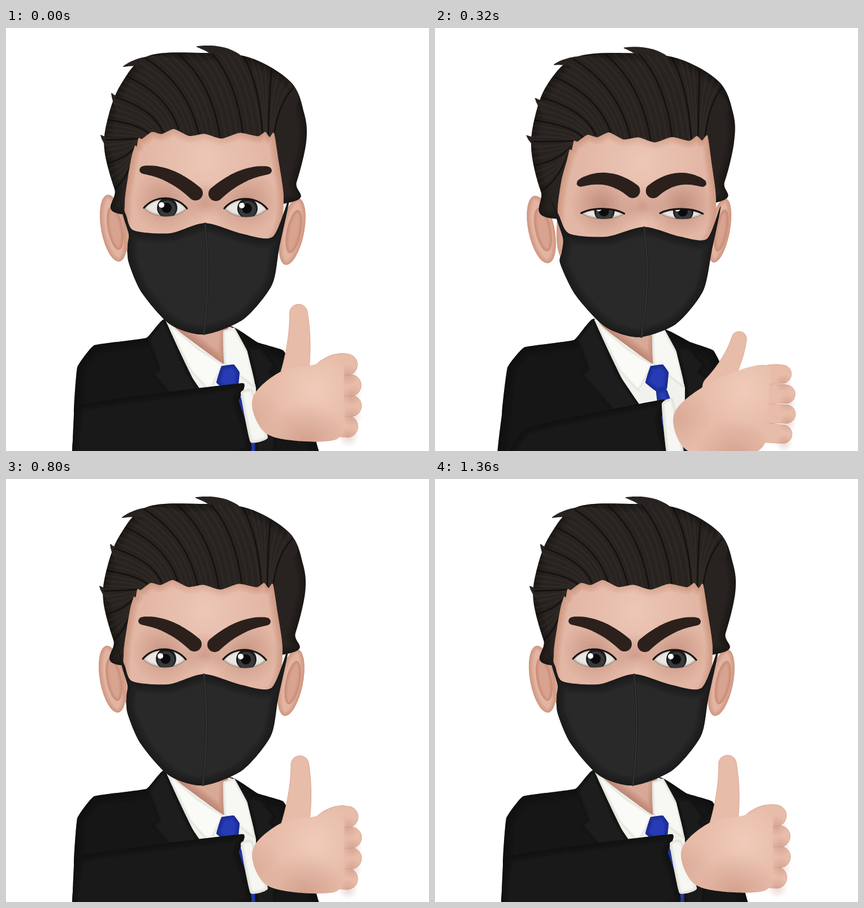
An HTML page with a canvas that plays this animation: 748x748 px, repeating every 1.44 s.

```html
<!DOCTYPE html>
<html lang="en">
<head>
<meta charset="utf-8">
<title>Thumbs up</title>
<style>
html, body { margin: 0; width: 100%; height: 100%; overflow: hidden; background: #fff; }
canvas { display: block; width: 100%; height: 100%; }
</style>
</head>
<body>
<canvas id="stage" width="748" height="748"></canvas>
<script>
const ctx = document.getElementById('stage').getContext('2d');
const STEP = 80, LOOP = 1440, TURN = 80, SETTLED = 480;

// --- numbers and points
const lerp = (a, b, t) => a + (b - a) * t;
const mix = (p, q, t) => p.map((v, i) => lerp(v, q[i], t));
const span = (t, a, b) => Math.min(1, Math.max(0, (t - a) / (b - a)));
const smooth = (t, a, b) => { const u = span(t, a, b); return u * u * (3 - 2 * u); };
const points = s => s.trim().split(/\s+/).map(p => p.split(',').map(Number));
const blend = (a, b, t) => points(a).map((p, i) => mix(p, points(b)[i], t));
const quad = (a, c, b, t) => mix(mix(a, c, t), mix(c, b, t), t);

function along(pts, u) {
  const x = u * (pts.length - 1), i = Math.min(pts.length - 2, Math.floor(x));
  return mix(pts[i], pts[i + 1], x - i);
}

// --- paths
function curve(pts, bend = 1 / 6) {
  const path = new Path2D(), n = pts.length, at = i => pts[(i + n) % n];
  path.moveTo(...pts[0]);
  pts.forEach((b, i) => {
    const a = at(i - 1), c = at(i + 1), d = at(i + 2);
    path.bezierCurveTo(b[0] + (c[0] - a[0]) * bend, b[1] + (c[1] - a[1]) * bend,
      c[0] - (d[0] - b[0]) * bend, c[1] - (d[1] - b[1]) * bend, ...c);
  });
  path.closePath();
  return path;
}

// A round brush swept along a curve while its radius changes.
function sweep(a, c, b, r0, r1, power = 1) {
  const path = new Path2D();
  for (let i = 0; i <= 50; i++) {
    const t = i / 50, [x, y] = quad(a, c, b, t), r = lerp(r0, r1, t ** power);
    path.moveTo(x + r, y);
    path.arc(x, y, r, 0, 7);
  }
  return path;
}

function arc(a, c, b) {
  const path = new Path2D();
  path.moveTo(...a);
  path.quadraticCurveTo(...c, ...b);
  return path;
}

function oval(x, y, rx, ry, tilt) {
  const path = new Path2D();
  path.ellipse(x, y, rx, ry, tilt, 0, 7);
  return path;
}

// --- paint
function fill(path, color) { ctx.fillStyle = color; ctx.fill(path); }
function line(path, color, width) { ctx.strokeStyle = color; ctx.lineWidth = width; ctx.stroke(path); }
function dot(x, y, r, color) { fill(oval(x, y, r, r, 0), color); }
function inside(path, paint) { ctx.save(); ctx.clip(path); paint(); ctx.restore(); }
function moved(x, y, paint) { ctx.save(); ctx.translate(x, y); paint(); ctx.restore(); }

function blob(x, y, r, rgb, alpha) {
  const g = ctx.createRadialGradient(x, y, 0, x, y, r);
  g.addColorStop(0, `rgba(${rgb},${alpha})`);
  g.addColorStop(1, `rgba(${rgb},0)`);
  dot(x, y, r, g);
}

// Fill with a soft darker rim that suggests volume.
function solid(path, color, rim, width) {
  fill(path, color);
  inside(path, () => {
    for (let k = 1; k <= 6; k++) line(path, `rgba(${rim},.07)`, width * k / 6);
  });
}

const SKIN = '#e7bca9', SKIN_SHADE = '165,98,80', HAIR = '#282320';

// --- parts
function drawTorso(yaw) {
  const body = curve(blend(
    '61,830 112,675 137,602 166,580 236,568 282,511 440,555 480,554 503,573 526,645 567,830',
    '132,830 120,682 126,600 156,561 248,548 280,515 400,528 445,556 490,570 512,612 563,830', yaw), .05);
  const piece = (s, color, rim, width) => solid(curve(points(s), .03), color, rim, width);
  solid(body, '#161616', '0,0,0', 36);
  piece('282,515 400,530 442,635 441,760 415,760 350,660', '#f1f1ed', '190,190,180', 4);
  piece('286,512 392,525 385,594 300,532', '#d9a997', '140,78,63', 30);
  piece('282,516 340,566 384,595 360,642 325,605', '#fafaf7', '185,185,175', 9);
  piece('384,536 404,530 430,578 441,637 386,594', '#f7f7f4', '185,185,175', 9);
  piece('391,643 410,640 441,725 441,760 407,760', '#2a40b8', '10,20,90', 16);
  piece('381,598 403,595 413,609 410,638 392,643 372,627', '#263bb4', '10,20,90', 16);
  inside(body, () => {
    piece('280,514 250,551 268,603 258,614 385,760 425,760 325,612', '#1d1d1d', '0,0,0', 14);
    piece('425,563 452,565 478,596 470,608 486,622 475,760 441,760 442,635', '#1b1b1b', '0,0,0', 14);
  });
  dot(508, 702, 5, '#eeeeea');
}

function drawHand(grip) {
  const soft = path => {
    line(path, '#d7a18d', 1.5);
    fill(path, SKIN);
  };
  const reach = lerp(633, 621, grip), r = lerp(15, 18.5, grip), gap = lerp(35, 36.5, grip);
  for (let i = 3; i >= 0; i--) {
    const y = lerp(618, 595, grip) + i * gap, x = reach + 8 * Math.sin(i) - r;
    const base = [555, lerp(640, 620, grip) + i * 25];
    soft(sweep(base, [575, y - 3], [x, y], r + 3, r));
    blob(x + 2, y + r, r, SKIN_SHADE, .25);
  }
  soft(sweep(mix([490, 640], [508, 622], grip), mix([530, 605], [522, 560], grip),
    mix([545, 566], [517, 504], grip), lerp(20, 25, grip), lerp(12, 15.5, grip)));
  const palm = curve(blend(
    '418,692 468,645 540,607 590,605 588,650 582,735 545,765 480,770 432,750',
    '437,652 485,608 545,595 592,581 597,640 595,715 560,731 480,725 447,702', grip));
  fill(palm, SKIN);
  inside(palm, () => {
    blob(545, 640, 75, '250,217,201', .5);
    blob(530, lerp(775, 735, grip), 75, SKIN_SHADE, .3);
    blob(430, 690, 60, SKIN_SHADE, .2);
  });
}

function drawArm({ grip, lift, swing }) {
  moved(0, (1 - lift) * 250, () => {
    solid(curve(blend('90,820 170,722 398,667 396,700 406,820',
      '122,820 130,668 418,628 412,660 432,750', grip), .04), '#191919', '0,0,0', 26);
    solid(curve(blend('396,672 416,663 434,775 404,775',
      '415,645 436,640 463,724 432,732', grip), .06), '#f6f6f2', '180,180,170', 12);
    ctx.translate(440, 680);
    ctx.rotate(swing);
    ctx.translate(-440, -680);
    drawHand(grip);
  });
}

function drawEar(x, y, rx, ry, tilt) {
  const ear = oval(x, y, rx, ry, tilt);
  solid(ear, '#e3b4a2', SKIN_SHADE, 16);
  inside(ear, () => solid(oval(x + 3, y, rx * .6, ry * .65, tilt), '#d8a491', SKIN_SHADE, 12));
}

function drawHair(yaw, hairline) {
  const shape = blend(
    '182,165 204,100 266,59 345,45 445,60 520,93 552,155 543,210 528,272 500,310 241,368 190,305 180,235',
    '180,160 203,100 250,50 345,44 430,52 503,95 527,150 531,200 514,272 495,310 212,330 192,285 174,215', yaw);
  const hair = curve(shape);
  solid(hair, HAIR, '8,6,5', 30);

  const tufts = [
    ['320,75 270,58 248,51', '300,75 250,50 208,68'],
    ['400,70 380,52 345,45', '400,62 380,38 338,33'],
    ['235,175 195,165 162,161', '225,150 200,140 187,116'],
    ['240,205 195,205 163,193', '205,205 185,210 168,190'],
    ['520,175 545,195 537,234', '480,140 525,130 497,93']
  ];
  for (const [turned, front] of tufts) fill(sweep(...blend(turned, front, yaw), 20, 1), HAIR);

  // Locks run from the hairline back over the crown.
  const crown = [...shape.slice(-2), ...shape.slice(0, 7)];
  inside(hair, () => {
    for (let i = 0; i <= 44; i++) {
      const u = i / 44, root = along(hairline, u), tip = along(crown, u * .9);
      const lock = arc(root, [lerp(root[0], tip[0], .2), lerp(root[1], tip[1], .65)], tip);
      if (i % 4) line(lock, 'rgba(72,64,57,.22)', 3);
      else line(lock, 'rgba(12,9,8,.7)', 2.5);
    }
  });
}

function drawEye(x, y, half, lid) {
  const top = lerp(17, 2, lid), low = lerp(15, 7, lid), mid = y + lid * 5;
  const lash = new Path2D();
  lash.moveTo(x - half, mid);
  lash.bezierCurveTo(x - half * .5, mid - top / .75, x + half * .5, mid - top / .75, x + half, mid + 1);
  const eye = new Path2D(lash);
  eye.bezierCurveTo(x + half * .6, mid + low / .75, x - half * .6, mid + low / .75, x - half, mid);
  solid(eye, '#eae6e2', '100,85,80', 8);
  inside(eye, () => {
    dot(x + 3, y, 18, '#1b1c1e');
    dot(x + 3, y + 2, 15, '#37393b');
    dot(x + 2, y, 9, '#0b0b0c');
    dot(x - 7, y - 5, 5, '#fff');
  });
  line(eye, 'rgba(80,50,42,.4)', 1);
  line(lash, '#171311', 3.2);
}

// The brow keeps its place over the eye; anger lifts the outside and drops the inside.
function drawBrow(x, y, wide, anger) {
  const outer = [x - 41 * wide, y + lerp(-43, -67, anger)];
  const arch = [x + lerp(8, 6, anger) * wide, y + lerp(-73, -67, anger)];
  const inner = [x + 53 * wide, y + lerp(-40, -26, anger)];
  fill(sweep(outer, arch, inner, 5, 13, .4), '#2b201b');
}

function drawFace(yaw, { anger, lid }, hairline) {
  const jaw = blend('520,262 522,320 517,392 430,540 258,442 246,375 256,300 280,262',
    '482,235 491,300 478,370 350,520 216,400 210,310 216,262 222,228', yaw);
  const fringe = [];
  for (let i = 0; i <= 14; i++) {
    const [x, y] = along(hairline, i / 14);
    fringe.push([x, y + (i % 2 ? 4 : -4)]);
  }
  const face = curve([...fringe, ...jaw], .1);
  const eyes = [
    { at: mix([358, 350], [282, 318], yaw), wide: 1, side: 1 },
    { at: mix([486, 347], [424, 319], yaw), wide: lerp(.72, 1, yaw), side: -1 }
  ];
  const bridge = mix(eyes[0].at, eyes[1].at, .5);

  solid(face, '#e3b7a5', SKIN_SHADE, 26);
  inside(face, () => {
    blob(bridge[0], bridge[1] - 85, 105, '243,209,195', .6);
    for (const { at: [x, y] } of eyes) blob(x, y - 12, 58, '155,90,74', lerp(.38, .5, lid));
    blob(bridge[0], bridge[1] - 8, 40, '165,100,84', .35);
    blob(bridge[0] + 3, bridge[1] + 22, 28, '243,205,189', .55);
  });
  for (const { at: [x, y], wide, side } of eyes) {
    drawEye(x, y, lerp(33, 38, wide), lid);
    drawBrow(x, y, wide * side, anger);
  }
}

function drawMask(yaw) {
  solid(curve(blend(
    `215,297 247,332 288,388 360,394 444,380 495,389 518,390 518,392 516,415 490,510
     450,560 400,567 345,545 285,492 240,424 262,447 266,405 245,350`,
    `200,298 212,330 226,358 290,363 352,345 418,364 472,369 502,297 483,390 470,455
     420,515 350,542 290,524 240,468 217,415 215,385 217,365 208,335`, yaw), .13), '#292929', '8,8,8', 34);
  const seam = blend('444,381 470,470 428,567', '352,346 362,440 350,541', yaw);
  line(arc(...seam), '#1f1f1f', 4);
  line(arc(...seam), '#363636', 1.8);
}

function drawHead(rig) {
  const { yaw } = rig;
  const hairline = blend('280,250 298,216 345,212 405,226 470,230 515,213',
    '228,212 237,193 286,181 362,193 452,187 474,190', yaw);
  moved(-8 * Math.sin(Math.PI * yaw), 0, () => {
    drawEar(...mix([204, 366, 28, 64, -.32], [190, 354, 22, 60, -.18], yaw));
    drawEar(...mix([515, 350, 6, 48, .15], [506, 360, 21, 60, .2], yaw));
    drawHair(yaw, hairline);
  });
  drawFace(yaw, rig, hairline);
  drawMask(yaw);
}

// --- motion
function rigAt(t) {
  const after = t - SETTLED;
  return {
    yaw: 1 - (1 - span(t, TURN, SETTLED)) ** 1.8,
    anger: smooth(t, 240, SETTLED),
    grip: smooth(t, 240, SETTLED),
    lift: span(t, TURN, 240),
    lid: .87 * Math.sin(Math.PI * span(t, TURN, 400)),
    swing: after < 0 ? 0 : -.045 * Math.exp(-after / 300) * Math.cos(after / 320 * Math.PI),
    sway: after < 0 ? 0 : -2 * (1 - smooth(t, 800, 1120)),
    nod: after < 0 ? 0 : 2 * (1 - span(t, SETTLED, 640))
  };
}

function draw(now) {
  const t = Math.floor(now % LOOP / STEP) * STEP;
  const rig = rigAt(t < TURN ? LOOP : t);
  ctx.fillStyle = '#fff';
  ctx.fillRect(0, 0, 748, 748);
  ctx.lineJoin = ctx.lineCap = 'round';
  drawTorso(rig.yaw);
  moved(rig.sway, rig.nod, () => drawHead(rig));
  drawArm(rig);
}

const start = performance.now();
function tick() {
  draw(performance.now() - start);
  requestAnimationFrame(tick);
}
tick();
</script>
</body>
</html>
```
